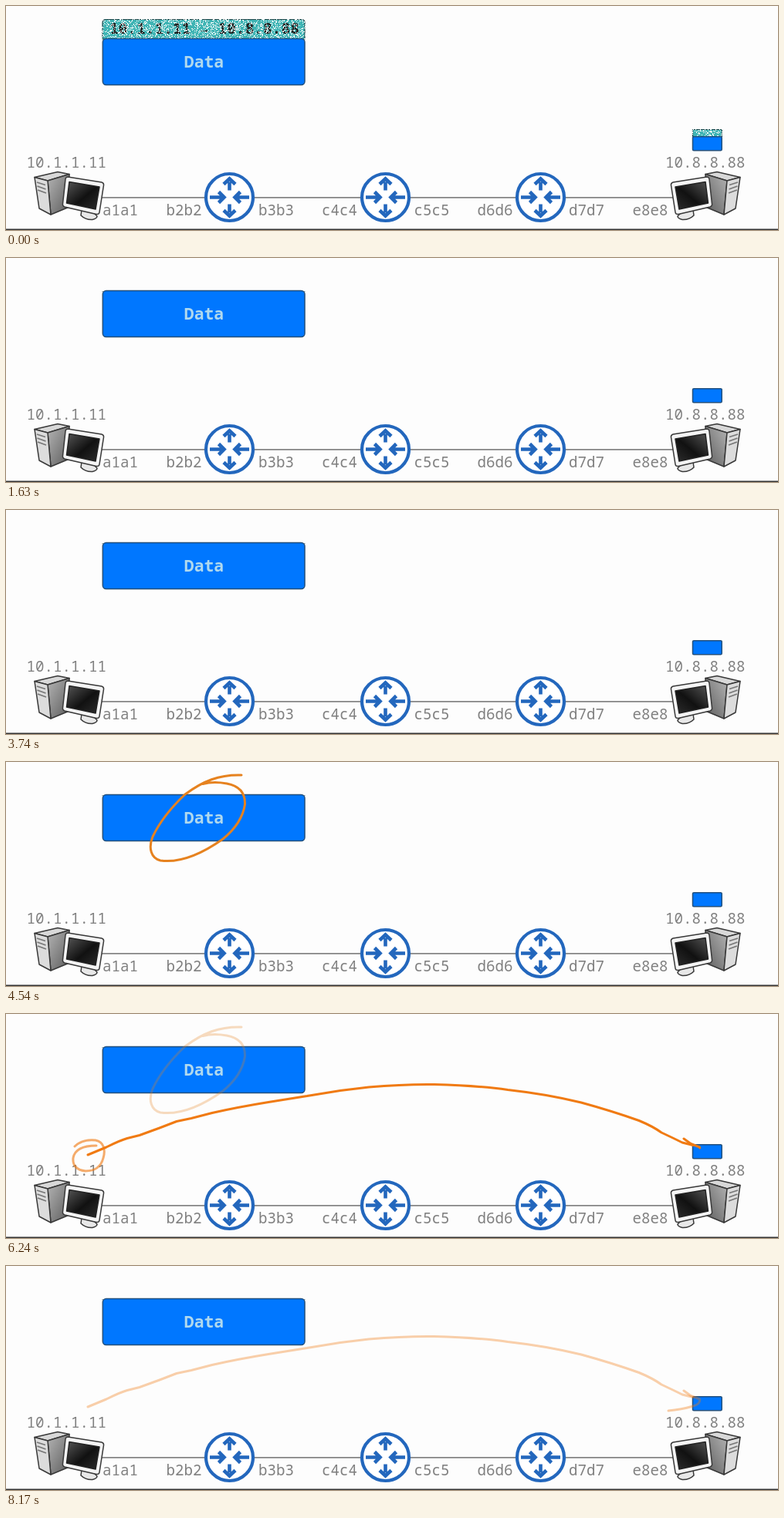
Animation, 1000 px wide and 291 px high, one loop 8.27 s. Source, as an HTML page:

```html
<!DOCTYPE html>
<html lang="en">
<head>
<meta charset="utf-8">
<title>Packet delivery</title>
<style>
  html, body { margin: 0; width: 100%; height: 100%; overflow: hidden; background: #fdfdfd; }
  svg { display: block; width: 1000px; height: 291px; }
  text { font: 500 19.15px "Noto Sans Mono", monospace; fill: #808080; }
  .mid { text-anchor: middle; }
  .data { font-size: 21.4px; font-weight: 700; fill: #b0d9ee; }
  .box { fill: #07f; stroke: #23507c; stroke-width: 1.5; }
  .head { fill: #3fb4b4; stroke: #24494c; stroke-width: 1.2; }
  .addr { font-size: 19.5px; font-weight: 700; fill: #222; }
  .pen { fill: none; stroke: #f07a12; stroke-width: 3; stroke-linecap: round; stroke-linejoin: round;
    stroke-dasharray: 1 1.1; animation: 8270ms linear infinite; }
  #ring { animation-name: ring; stroke: #e6821f; }
  #spot { animation-name: spot; }
  #arc { animation-name: arc; }
  #tip { animation-name: tip; }
  @keyframes ring {
    0%, 48.85% { stroke-dashoffset: 1; opacity: 0; }
    48.86% { stroke-dashoffset: 1; opacity: 1; }
    54.2% { stroke-dashoffset: 0; }
    56% { opacity: 1; }
    83%, 100% { stroke-dashoffset: 0; opacity: 0; }
  }
  @keyframes spot {
    0%, 58.6% { stroke-dashoffset: 1; opacity: 0; }
    58.61% { stroke-dashoffset: 1; opacity: 1; }
    62.3% { stroke-dashoffset: 0; }
    63.5% { opacity: 1; }
    95%, 100% { stroke-dashoffset: 0; opacity: 0; }
  }
  @keyframes arc {
    0%, 64.1% { stroke-dashoffset: 1; opacity: 0; }
    64.11% { stroke-dashoffset: 1; opacity: 1; }
    74% { stroke-dashoffset: 0; }
    77.9% { opacity: 1; }
    100% { stroke-dashoffset: 0; opacity: .32; }
  }
  @keyframes tip {
    0%, 74.1% { stroke-dashoffset: 1; opacity: 0; }
    74.11% { stroke-dashoffset: 1; opacity: 1; }
    78% { stroke-dashoffset: 0; }
    79% { opacity: 1; }
    100% { stroke-dashoffset: 0; opacity: .34; }
  }
</style>
</head>
<body>
<svg viewBox="0 0 1000 291">
  <defs>
    <linearGradient id="side" x2="1" y2="1">
      <stop stop-color="#b4b4b4"/><stop offset="1" stop-color="#5c5c5c"/>
    </linearGradient>
    <linearGradient id="glass" x2="1" y2="1">
      <stop stop-color="#555"/><stop offset=".55" stop-color="#111"/><stop offset="1" stop-color="#2c2c2c"/>
    </linearGradient>
    <path id="arrow" d="M0 9V20M-7.5 17L0 24L7.5 17" fill="none" stroke="#2367bd" stroke-width="4.6"/>
    <path id="inward" d="M0 25.5V9M-7 14L0 7L7 14" fill="none" stroke="#2367bd" stroke-width="4.6"/>
    <g id="router">
      <circle r="30.5" fill="#fff" stroke="#2367bd" stroke-width="4.2"/>
      <use href="#arrow"/>
      <use href="#arrow" transform="scale(1 -1)"/>
      <use href="#inward" transform="rotate(90)"/>
      <use href="#inward" transform="rotate(-90)"/>
    </g>
    <g id="pc" stroke="#383838" stroke-width="1.5" stroke-linejoin="round">
      <path d="M37 222.5L67 215.5L82 218.5L54 227Z" fill="#d8d8d8"/>
      <path d="M54 227L82 218.5V261L58 271Z" fill="url(#side)"/>
      <path d="M37 222.5L54 227L58 271L43 263Z" fill="#dcdcdc"/>
      <path d="M40 229L51 232.5M40.5 234L51.5 238M41 239L52 243" stroke="#777" stroke-width="1.8"/>
      <path d="M98 265L97 272Q103 278 112 277.5Q118 276 118 273L112 267Z" fill="#e8e8e8"/>
      <path d="M80 222L124 229Q127 230 126.5 233L121 268Q120.5 271 117 270.5L76 261Q73 260 73.5 257L77 225Q77.5 222 80 222Z" fill="#f4f4f4"/>
      <path d="M82 228.5L121 235L116 264L78.5 256Z" fill="url(#glass)" stroke="#222"/>
    </g>
  </defs>

  <rect width="1000" height="291" fill="#fdfdfd"/>
  <path d="M120 248.8H868" stroke="#858585" stroke-width="1.8"/>
  <path d="M0 290.3H1000" stroke="#333" stroke-width="1.4"/>
  <use href="#router" x="289.5" y="248.5"/>
  <use href="#router" x="491.5" y="248.5"/>
  <use href="#router" x="692.5" y="248.5"/>
  <use href="#pc"/>
  <use href="#pc" transform="matrix(-1 0 0 1 988 0)"/>

  <text x="26.5" y="210">10.1.1.11</text>
  <text x="854" y="210">10.8.8.88</text>
  <g id="ports"></g>

  <path class="head" d="M125 43V22Q125 17.5 129.5 17.5H383Q387 17.5 387 22V43Z"/>
  <text class="addr mid" x="257" y="36">10.1.1.11 → 10.8.8.88</text>
  <path class="head" d="M889.5 170V160.5H927.3V170Z"/>
  <g id="dissolve" fill="#fdfdfd" shape-rendering="crispEdges"></g>

  <rect class="box" x="125.3" y="42.5" width="261.7" height="60" rx="4.5"/>
  <text class="data mid" x="256.5" y="80">Data</text>
  <rect class="box" x="889.5" y="169.7" width="37.7" height="18" rx="1.5"/>

  <path class="pen" id="ring" pathLength="1" d="M305 17C276 16 255 25 232 42C213 60 199 78 190 97C184 112 188 125 200 128C222 131 250 122 281 100C297 87 307 71 309.5 55C310 40 302 31 286 28C275 26 264 26 255 28.5"/>
  <path class="pen" id="spot" pathLength="1" d="M89 172C96 165 107 163 116 164C127 166 129 177 126 187C123 199 114 204 103 204C92 203 86 197 87 187C89 176 100 171 117 171"/>
  <path class="pen" id="arc" pathLength="1" d="M106 183L130 173Q148 164 157 161.5L173 157.5L199 148L221 139.5L240 135.5L267 128.5Q300 121 340 114.5L390 106.5Q430 99 470 95Q515 91 555 91.5Q612 93 650 98.5Q700 104 745 115Q785 126 820 138.5Q838 146 849 154Q864 161 876 167L890 170.5"/>
  <path class="pen" id="tip" pathLength="1" d="M878 162L887 168.5L898.5 173Q900 179 890 182Q875 186.5 858 188"/>
</svg>
<script>
  const NS = 'http://www.w3.org/2000/svg';
  const LOOP = 8270, GROUPS = 12, GONE = 3, STEP = 60;

  function add(parent, tag, attrs, text = '') {
    const el = document.createElementNS(NS, tag);
    for (const key in attrs) el.setAttribute(key, attrs[key]);
    el.textContent = text;
    return document.getElementById(parent).appendChild(el);
  }

  const ports = { a1a1: 125, b2b2: 207.5, b3b3: 327, c4c4: 409, c5c5: 528.5, d6d6: 610.5, d7d7: 729, e8e8: 811.5 };
  for (const name in ports) add('ports', 'text', { x: ports[name], y: 272 }, name);

  // Scatter small cells over both headers; each group covers its cells in turn.
  let seed = 7;
  const random = () => (seed = seed * 16807 % 2147483647) / 2147483647;
  const cells = Array(GROUPS).fill('');
  function scatter(x0, y0, x1, y1) {
    for (let y = y0; y < y1; y++)
      for (let x = x0; x < x1; x++)
        cells[Math.floor(random() * GROUPS)] += `M${x} ${y}h1v1h-1z`;
  }
  scatter(124, 16, 389, 43);
  scatter(888, 159, 929, 170);

  cells.forEach((d, i) => {
    const cover = add('dissolve', 'path', { d });
    const at = (i - GONE + 1) * STEP / LOOP;
    if (at <= 0) return;
    cover.animate([
      { opacity: 0, offset: 0 }, { opacity: 0, offset: at },
      { opacity: 1, offset: at }, { opacity: 1, offset: 1 }
    ], { duration: LOOP, iterations: Infinity });
  });
</script>
</body>
</html>
```
